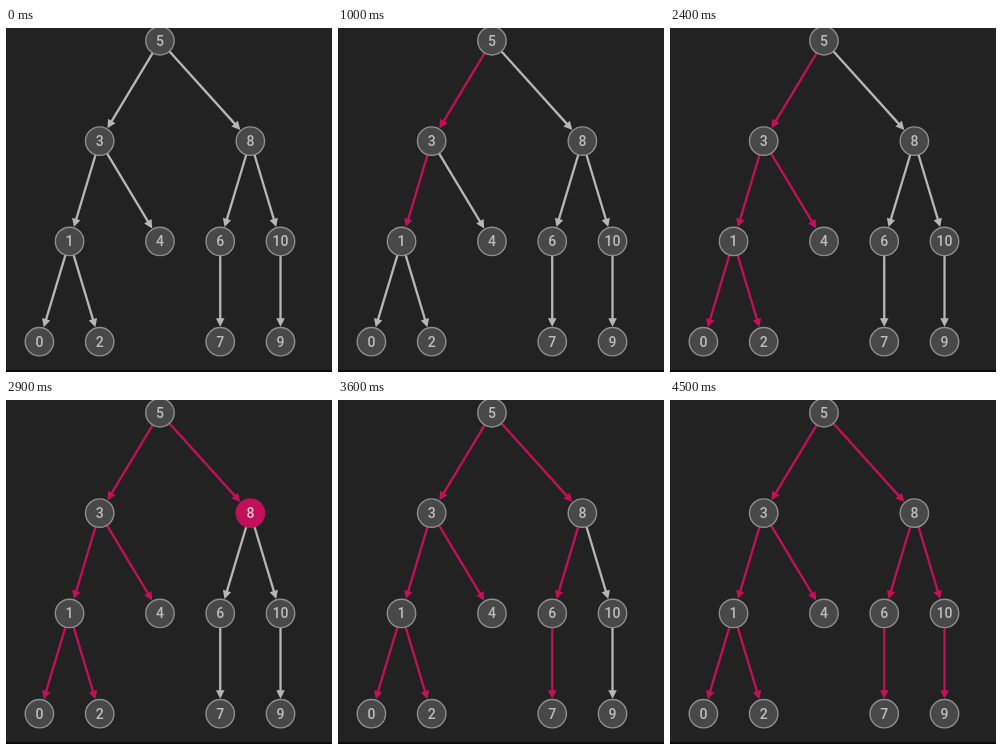
These frames come from a looping animation (326x344 px, 6 s). An HTML page:

```html
<!DOCTYPE html>
<html lang="en">
<head>
<meta charset="utf-8">
<title>Depth-first traversal</title>
<style>
  html, body { margin: 0; width: 100%; height: 100%; overflow: hidden; background: #222; }
  svg { display: block; width: 326px; height: 344px; }
  circle { fill: #484848; stroke: #8e8e8e; stroke-width: 1.4; }
  text { fill: #bdbdbd; font: 500 14px Roboto, Arial, sans-serif; text-anchor: middle; }
  .edge { stroke: #b6b6b6; fill: #b6b6b6; }
  .edge line { stroke-width: 2.3; }
  .edge path { stroke: none; }
  .edge.visited { stroke: #c2105a; fill: #c2105a; }
  .active circle { fill: #c2105a; stroke: #b51457; }
  .active text { fill: #e0c4d0; }
</style>
</head>
<body>
<svg viewBox="0 0 326 344">
  <rect width="326" height="344" fill="#222"/>
  <rect y="342" width="326" height="2" fill="#0c0c0c"/>
  <g id="edges"></g>
  <g id="nodes"></g>
</svg>
<script>
const LOOP = 6000, FLASH = 100, REACH = 15, HEAD = 8.5, HALF = 4.3;

// value, column, row, parent, visit time, whether the node flashes
const tree = [
  [5, 4, 0, null, 500, true],
  [3, 2, 1, 5, 700, true],
  [1, 1, 2, 3, 1000, false],
  [0, 0, 3, 1, 1200, true],
  [2, 2, 3, 1, 1800, false],
  [4, 4, 2, 3, 2300, true],
  [8, 7, 1, 5, 2900, true],
  [6, 6, 2, 8, 3100, true],
  [7, 6, 3, 6, 3500, true],
  [10, 8, 2, 8, 4100, true],
  [9, 8, 3, 10, 4400, true]
];

function add(parent, tag, attrs = {}) {
  const el = document.createElementNS("http://www.w3.org/2000/svg", tag);
  for (const key in attrs) el.setAttribute(key, attrs[key]);
  parent.appendChild(el);
  return el;
}

function drawEdge(from, to) {
  const dx = to.x - from.x, dy = to.y - from.y, length = Math.hypot(dx, dy);
  const angle = Math.atan2(dy, dx) * 180 / Math.PI;
  const tip = length - REACH, base = tip - HEAD;
  const g = add(edges, "g", {
    class: "edge", transform: `translate(${from.x} ${from.y}) rotate(${angle})`
  });
  add(g, "line", { x1: 14, x2: base + 1 });
  add(g, "path", { d: `M${tip} 0L${base} ${-HALF}V${HALF}Z` });
  return g;
}

function drawNode({ value, x, y }) {
  const g = add(nodes, "g");
  add(g, "circle", { cx: x, cy: y, r: 14.2 });
  add(g, "text", { x, y: y + 5 }).textContent = value;
  return g;
}

const edges = document.getElementById("edges");
const nodes = document.getElementById("nodes");
const byValue = new Map();

for (const [value, col, row, parent, time, flashes] of tree) {
  const node = { value, time, flashes, x: 33.4 + col * 30.14, y: 12.8 + row * 100.3 };
  byValue.set(value, node);
  if (parent !== null) node.edge = drawEdge(byValue.get(parent), node);
  node.shape = drawNode(node);
}

function render(t) {
  for (const { edge, shape, time, flashes } of byValue.values()) {
    if (edge) edge.classList.toggle("visited", t >= time);
    shape.classList.toggle("active", flashes && t >= time && t < time + FLASH);
  }
}

const start = performance.now();
function tick() {
  render((performance.now() - start) % LOOP);
  requestAnimationFrame(tick);
}
tick();
</script>
</body>
</html>
```
